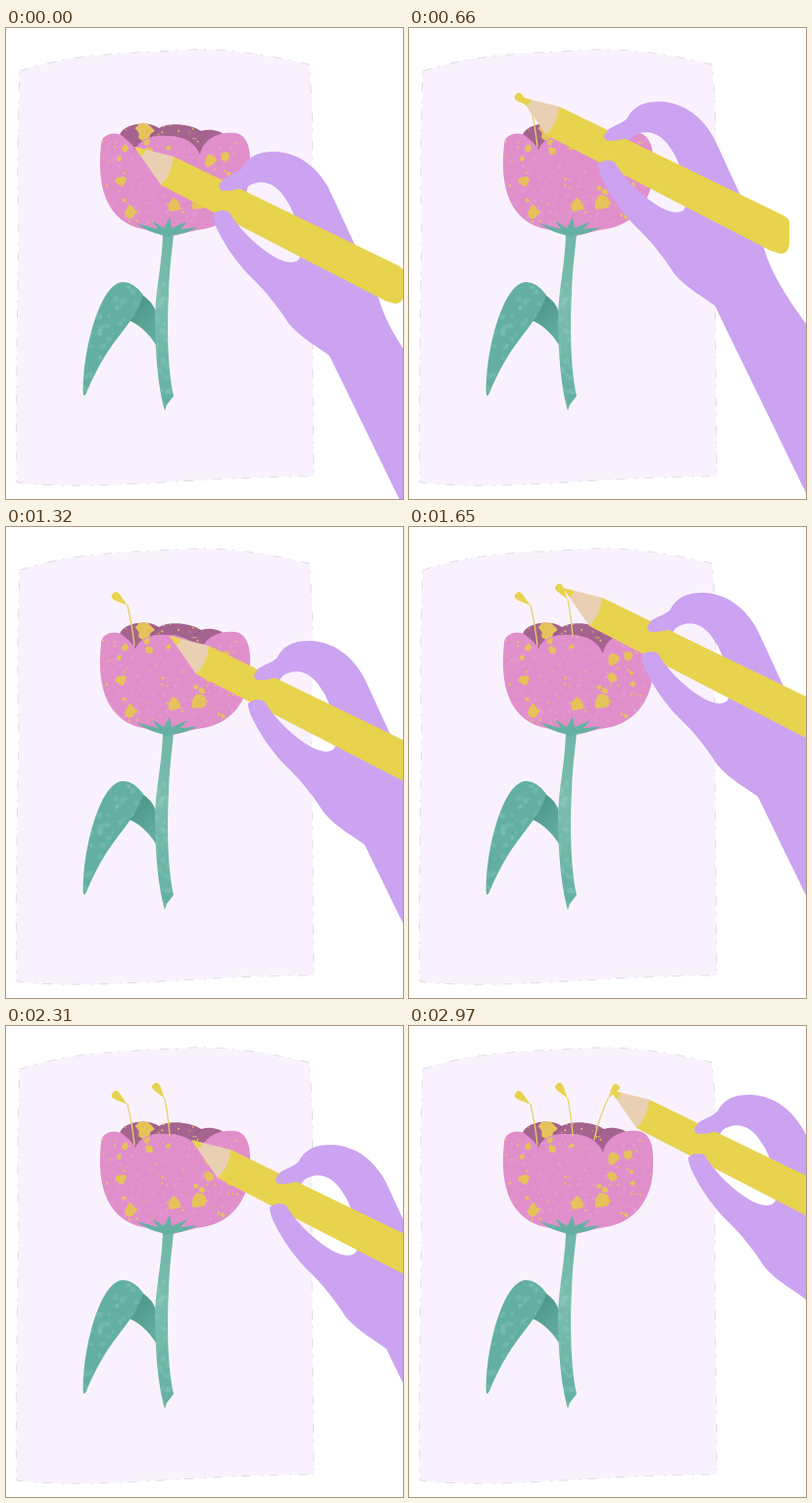
An HTML page for the animation above (3300 ms loop, 405 px wide and 480 px high).

```html
<!DOCTYPE html>
<html lang="en">
<head>
<meta charset="utf-8">
<title>Drawing a flower</title>
<style>
html, body { margin: 0; width: 100%; height: 100%; overflow: hidden; background: #fff; }
svg { display: block; width: 100%; height: 100%; }
.line { fill: none; stroke: #e8d068; stroke-width: 1.3; stroke-linecap: round; }
.gold { fill: #e8d34e; }
.spot { fill: #e6c35a; }
.hand { fill: #cba3f0; }
</style>
</head>
<body>
<svg viewBox="0 0 405 480">
  <defs>
    <path id="back" d="M116 109C120 97 145 94 156 102C164 96 188 97 199 105C208 102 219 105 223 109L199 130L132 126Z"/>
    <path id="petals" d="M97 119C97 107 114 104 121 112Q129 118 132 124C137 112 151 109 162 110C181 109 193 117 198 129C201 112 219 105 234 107C246 109 250 123 249 140C250 176 230 203 194 206L170 212L140 205C104 198 92 164 97 119Z"/>
    <path id="leaf" d="M79 374C77 336 94 262 118 259Q130 258 140 272C137 285 127 299 116 313C103 330 94 344 82 372Q80 376 79 374Z"/>
    <path id="stem" d="M160 209C159 246 152 266 152 303C153 342 156 369 162 390L164 384L171 375C165 349 164 305 166 270C167 240 170 224 171 209Z"/>
    <clipPath id="inBack"><use href="#back"/></clipPath>
    <clipPath id="inPetals"><use href="#petals"/></clipPath>
    <clipPath id="inGreen"><use href="#leaf"/><use href="#stem"/></clipPath>
    <linearGradient id="fold" x2=".6" y2="1">
      <stop offset=".2" stop-color="#4b9687"/><stop offset="1" stop-color="#62ad9f"/>
    </linearGradient>
    <linearGradient id="stemTone" x2="0" y2="1">
      <stop stop-color="#6fb6a9"/><stop offset=".4" stop-color="#7bbdb0"/><stop offset="1" stop-color="#62b0a2"/>
    </linearGradient>
  </defs>

  <path fill="#f9f2fe" stroke="#b5afb8" stroke-width=".4" stroke-dasharray="9 7 2 11" d="M14 44C70 25 125 26 190 22C230 21 270 28 309 37C311 58 314 85 312 150V250L314 457C230 457 150 465 90 466Q40 467 11 463C10 400 11 300 13 210C11 150 12 100 14 44Z"/>

  <use href="#back" fill="#a4648f"/>
  <path fill="none" stroke="#8f517c" stroke-width=".8" d="M156 102Q149 108 147 114M199 105Q193 109 191 114"/>
  <g id="backSpots" clip-path="url(#inBack)"></g>
  <use href="#petals" fill="#e18fcb"/>
  <g id="petalSpots" clip-path="url(#inPetals)"></g>

  <path fill="url(#fold)" d="M139 272C149 279 153 285 154 297L153 323C144 309 134 301 123 297Q133 286 139 272Z"/>
  <use href="#leaf" fill="#63b0a2"/>
  <use href="#stem" fill="url(#stemTone)"/>
  <g id="mottle" clip-path="url(#inGreen)"></g>
  <path fill="#64b1a3" d="M133 199L155 205L149 196L161 204L167 193L169 204L185 197L178 205L196 203Q183 210 170 211Q164 215 159 211Q145 208 133 199Z"/>

  <g id="stamens"></g>

  <!-- pencil point rests on 0,0 -->
  <g id="hand"><g transform="translate(-131 -121)">
    <path class="hand" fill-rule="evenodd" d="M217 161C220 151 232 151 240 144C247 130 258 126 274 126C300 127 318 143 329 163C338 182 346 200 355 219L380 275C388 303 405 328 430 362L520 724L330 334C320 326 302 317 289 302C278 285 265 268 250 254C234 238 213 208 211 190Q219 184 228 188ZM228 188C240 208 258 224 275 234C289 242 301 239 300 231C300 213 297 190 285 174C276 159 261 152 246 162Z"/>
    <path fill="#ead0b3" d="M131 121L171 131L174 145L158 160Z"/>
    <path class="gold" d="M131 121L142 124Q142 129 137 130ZM171 131L400 242Q406 245 406 250L406 271Q405 281 397 281L387 278L158 160Q169 150 171 131Z"/>
    <path class="hand" d="M217 161C220 152 231 152 240 144L252 157C243 163 233 166 223 166Q217 166 217 161ZM211 190Q217 184 227 187L238 203L221 214Q211 200 211 190Z"/>
  </g></g>
</svg>
<script>
const $ = id => document.getElementById(id);
let seed = 7;
const rnd = () => (seed = seed * 16807 % 2147483647) / 2147483647;

function add(parent, tag, attrs) {
  const el = document.createElementNS('http://www.w3.org/2000/svg', tag);
  for (const k in attrs) el.setAttribute(k, attrs[k]);
  parent.append(el);
  return el;
}

// ragged splash of paint
function splash(parent, x, y, r) {
  const pts = Array.from({ length: 11 }, (_, i) => {
    const a = i * Math.PI * 2 / 11, d = r * (.65 + rnd() * .55);
    return [x + d * Math.cos(a), y + d * Math.sin(a)];
  });
  add(parent, 'polygon', { points: pts.join(' '), class: 'spot' });
}

function speckle(parent, n, [x, y, w, h], size, attrs) {
  for (let i = 0; i < n; i++)
    add(parent, 'circle', { cx: x + rnd() * w, cy: y + rnd() * h, r: size * (.4 + rnd()), ...attrs });
}

const petalBox = [98, 112, 150, 88];
speckle($('petalSpots'), 220, petalBox, 1.2, { fill: '#ecaad9', opacity: .3 });
speckle($('petalSpots'), 75, petalBox, .9, { class: 'spot' });
speckle($('backSpots'), 26, [118, 98, 80, 20], .8, { class: 'spot' });
speckle($('mottle'), 190, [76, 258, 96, 132], 2.4, { fill: '#a2d5c9', opacity: .2 });

splash($('backSpots'), 142, 105, 9);
// the large splashes; the small ones fall at random
[[127, 187, 6.5], [117, 156, 6], [196, 178, 8], [172, 181, 7], [146, 125, 4], [208, 135, 6], [223, 131, 5], [207, 154, 5]]
  .forEach(s => splash($('petalSpots'), ...s));
for (let i = 0; i < 12; i++) splash($('petalSpots'), 104 + rnd() * 138, 116 + rnd() * 82, 1.5 + rnd() * 2);

// pen: where the pencil stops while it fills the head
const stamens = [
  { start: 0, base: [131, 121], neck: [124, 80], tip: [109, 68], pen: [113, 70] },
  { start: 4, base: [167, 111], neck: [162, 74], tip: [151, 59], pen: [157, 62] },
  { start: 7, base: [189, 116], neck: [203, 74], tip: [213, 60], pen: [205, 65] }
];

for (const s of stamens) {
  const [bx, by] = s.base, [nx, ny] = s.neck, [tx, ty] = s.tip;
  const dx = tx - nx, dy = ty - ny;
  const at = (along, side) => `${nx + dx * along - dy * side} ${ny + dy * along + dx * side}`;
  s.line = add($('stamens'), 'path', {
    class: 'line', d: `M${bx} ${by}Q${bx + (nx - bx) * .35} ${by + (ny - by) * .55} ${nx} ${ny}`
  });
  s.head = add($('stamens'), 'path', {
    class: 'gold', d: `M${at(0, 0)}C${at(.55, .12)} ${at(1, .42)} ${at(1, 0)}C${at(1, -.42)} ${at(.55, -.12)} ${at(0, 0)}`
  });
}

const STEP = 330, STEPS = 10;

function draw(now) {
  const step = Math.floor(now / STEP) % STEPS;
  for (const s of stamens) {
    // only the first stamen gets a separate stop at its neck
    const stops = s.start ? [s.base, s.pen] : [s.base, s.neck, s.pen];
    const stop = Math.min(step - s.start, stops.length - 1);
    s.line.style.display = stop > 0 ? '' : 'none';
    s.head.style.display = stop == stops.length - 1 ? '' : 'none';
    if (stop >= 0) $('hand').setAttribute('transform', `translate(${stops[stop]})`);
  }
  requestAnimationFrame(draw);
}
draw(performance.now());
</script>
</body>
</html>
```
